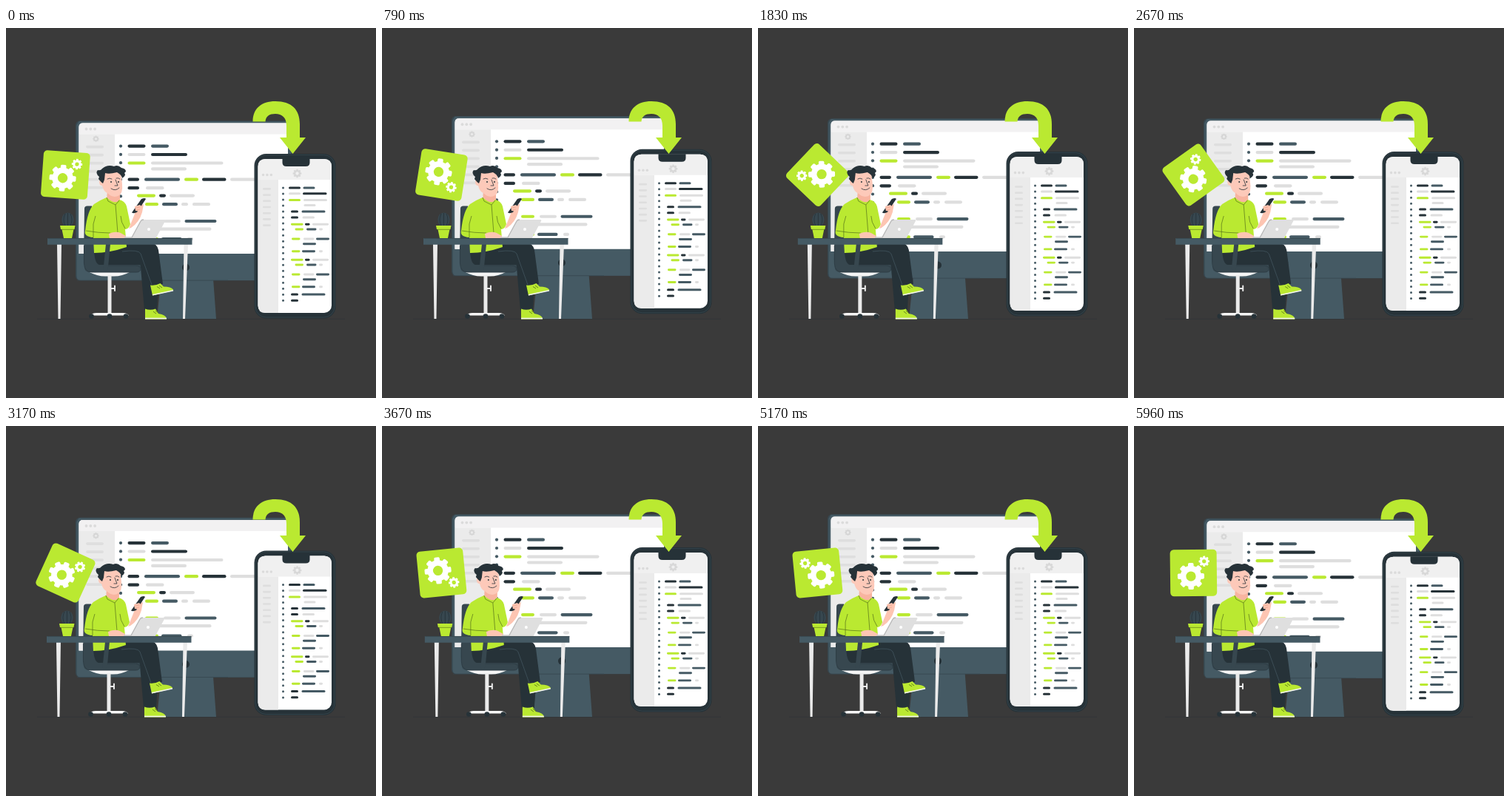
Recreate the animation shown at these times as an HTML page. Size 500 by 500 pixels, loop 6000 ms.

```html
<!DOCTYPE html>
<html lang="en">
<head>
<meta charset="utf-8">
<title>Coding at a desk</title>
<style>
  html, body { margin: 0; width: 100%; height: 100%; overflow: hidden; background: #3a3a3a; }
  svg { display: block; width: 100%; height: 100%; }
</style>
</head>
<body>
<svg viewBox="0 0 500 500">
  <path d="M42 393.3H458" stroke="#2b3236" stroke-width=".6"/>
  <path d="M211 325H279L284 393H204Z" fill="#455a64"/>

  <g class="float">
    <rect x="94" y="125.2" width="292" height="216" rx="6" fill="#37474f"/>
    <path d="M98.500 126H380Q386 126 386 132V335Q386 341 380 341H101Q95.500 341 95.500 335V131Z" fill="#455a64"/>
    <path d="M98.500 305V134Q98.500 128.500 104 128.500H381V305Z" fill="#fff"/>
    <path d="M98.500 143.500V134Q98.500 128.500 104 128.500H381V143.500Z" fill="#f2f1f2"/>
    <path d="M98.500 143.500H147V305H98.500Z" fill="#ebebeb"/>
    <path d="M96 341H300" stroke="#37474f" stroke-width=".7"/>
    <circle cx="243" cy="323.500" r="5" fill="#263238"/>
    <g id="desktop"></g>
  </g>

  <g id="badge">
    <rect x="-31.500" y="-31.500" width="63" height="63" rx="5" fill="#bae931"/>
  </g>

  <g id="worker" stroke-linejoin="round">
    <!-- chair -->
    <path d="M106 244Q106 240.500 110 240.500H116L124 322H112Q105 322 105 312Z" fill="#37474f"/>
    <path d="M112 329.500H168Q157 335.500 146 335.500H134Q123 335.500 112 329.500Z" fill="#f5f5f5"/>
    <path d="M140 334V387" stroke="#ebebeb" stroke-width="5"/>
    <path d="M141 352H147M147 348.500V355" stroke="#ebebeb" stroke-width="2" stroke-linecap="round"/>
    <path d="M114 388.500Q116 385 122 385H158Q164 385 166 388.500Z" fill="#f5f5f5"/>
    <g fill="#263238"><circle cx="115.500" cy="389.500" r="3.300"/><circle cx="140" cy="389.500" r="3.300"/><circle cx="162" cy="389.500" r="3.300"/></g>
    <path d="M106 318H182V324Q182 330 176 330H113Q106 330 106 323Z" fill="#37474f"/>

    <!-- legs -->
    <path d="M181 312L208 316L204 381H187Z" fill="#263238"/>
    <path d="M188 379.500Q195 382 202 379.500L206 386Q216 387.500 217 392.500V393.500H188Z" fill="#bae931"/>
    <path d="M188 392.500H217" stroke="#f5f5f5" stroke-width="1.600"/>
    <path d="M119 297L165 291H196Q204 291 206 300L212 346L196 349L186 320H126Q119 318 119 297Z" fill="#263238"/>
    <path d="M157 302Q179 299 182 305L197 347" fill="none" stroke="#455a64" stroke-width=".7"/>
    <path d="M195 347.500Q202 348.500 208.500 345L213 349.500Q223 349.500 226 353.500V355L198 361.500Z" fill="#bae931"/>
    <path d="M198 360.800L226 354.800" stroke="#f5f5f5" stroke-width="1.600"/>
    <path d="M204 349.500L208 352M207 348L211 351M199 383L203 386M202 382L206 385" stroke="#506b13" stroke-width=".8"/>

    <!-- head and shirt -->
    <path d="M166 271L174 251Q173 243 180 240L186 238L184 249Q180 263 169 270Z" fill="#fdc5b2"/>
    <path d="M137 218L154 220V238L145 241L136 235Z" fill="#f8b4a0"/>
    <path d="M136 229Q148 240 153 232Q161 234 163 241L168 265Q166 272 161 272L163 296Q140 304 119 304L118 283Q105 282 107 274Q110 246 119 238Q126 233 136 229Z" fill="#bae931"/>
    <path d="M136 229L138 234L148 239L153 233M148 239L151 277M118 283V265L121 254M108 274Q125 277 141 277M161 271Q155 262 155 254" fill="none" stroke="#55701a" stroke-width=".7"/>
    <path d="M129 195Q140 188 155 194L157 211Q158 223 153 226Q145 231 137 223Q132 221 130 213Q126 213 126 208Q126 204 131 205Z" fill="#fdc9b9"/>
    <path d="M131 210Q128 208 125 204L126 201Q120 196 124 192Q128 193 130 190Q137 184 146 187Q151 184 156 189Q162 190 162 194L160 196Q163 199 157 203Q156 198 150 195Q139 198 134 196L133 205Z" fill="#263238"/>
    <path d="M148 205L151 213L147 213M142 217Q148 221 153 216M137 204Q140 202 143 204M149 203Q152 202 154 204" fill="none" stroke="#263238" stroke-width=".8" stroke-linecap="round"/>
    <g fill="#263238"><circle cx="142" cy="208" r="1"/><circle cx="152" cy="208" r="1"/></g>
    <path d="M170 249.500L183 231Q188 229 189 231L177 249Q173 251 170 249.500Z" fill="#263238"/>
    <path d="M174 241L181 239L185 243L181 248L175 247Z" fill="#fdc5b2"/>
    <path d="M175 243L181 242M176 246L181 245" stroke="#eb9a84" stroke-width=".6"/>

    <!-- desk -->
    <path d="M69 292H75L73.500 393H70.500ZM240.500 292H246L242 393H239Z" fill="#ebebeb"/>
    <path d="M141 292L138 323Q137 329 133 329Q131 327 132 321L135 292Z" fill="#37474f"/>
    <path d="M105.500 294V318Q106 330 116 330H176Q182 330 182 325Q181 321 174 321H138" fill="none" stroke="#2e3d45" stroke-width="1"/>
    <path d="M56 284H251.500V292.800H56Z" fill="#455a64"/>
    <path d="M56.500 284.400H251.500" stroke="#37474f" stroke-width=".8"/>
    <path d="M139 278Q148 274 155 277L162 281V284H140Z" fill="#fdc5b2"/>
    <path d="M160 282.300H203V284H160Z" fill="#c7c7c7"/>
    <path d="M170 283L182 261Q183 259 186 259H214Q216 259 215 261L203 283.500H172Z" fill="#dfdfdf"/>
    <path d="M170 283L182 261Q183 259 186 259" fill="none" stroke="#b9b9b9" stroke-width="1.400"/>
    <circle cx="193" cy="272" r="2" fill="#fff"/>

    <!-- cactus -->
    <ellipse cx="83.500" cy="259" rx="8.200" ry="9.500" fill="#37474f"/>
    <path d="M83.500 250V268M80 251Q76 259 80 267M87 251Q91 259 87 267" fill="none" stroke="#263238" stroke-width=".8"/>
    <path d="M73 267H93.500L92.500 272H91.500L89 284H78L75.500 272H74Z" fill="#bae931"/>
    <path d="M75 272.300H92" stroke="#718f20" stroke-width=".9"/>
  </g>

  <g class="float">
    <rect x="335.500" y="170" width="110" height="222.500" rx="16" fill="#263238"/>
    <rect x="337" y="171.500" width="107" height="219.500" rx="14.500" fill="none" stroke="#37474f" stroke-width=".8"/>
    <rect x="340.500" y="177" width="99.500" height="208" rx="10" fill="#fff"/>
    <path d="M340.500 205V187Q340.500 177 350.500 177H430Q440 177 440 187V205Z" fill="#f0f0f0"/>
    <path d="M340.500 205H368V385H350.500Q340.500 385 340.500 375Z" fill="#ebebeb"/>
    <path d="M373.500 176.500H410.500V182Q410.500 187 405 187H379Q373.500 187 373.500 182Z" fill="#263238"/>
    <g id="mobile"></g>
  </g>

  <path d="M333.500 126.500C333.500 109 345 99 364 99C386 99 397 110 397 130V148H405L387.500 170L370 148H379V132C379 121 373 116 364 116C356 116 351 119 350.500 126.500Z" fill="#bae931"/>
</svg>

<script>
const $ = id => document.getElementById(id);
const colors = { k: '#263238', s: '#455a64', g: '#bae931', l: '#dedede' };

const dot = (x, y, r, fill) => `<circle cx="${x}" cy="${y}" r="${r}" fill="${fill}"/>`;

const bar = (x1, x2, y, h, color) =>
  `<path d="M${x1 + h / 2} ${y}H${x2 - h / 2}" stroke="${color}" stroke-width="${h}" stroke-linecap="round"/>`;

// Each row: "y colour+start-end ..."
const rows = (text, h, dy = 0) => text.trim().split('\n').map(row => {
  const [y, ...parts] = row.trim().split(' ');
  return parts.map(p => {
    const [a, b] = p.slice(1).split('-').map(Number);
    return bar(a, b, +y + dy, h, colors[p[0]]);
  }).join('');
}).join('');

const repeat = (n, fn) => Array.from({ length: n }, (_, i) => fn(i)).join('');

const gear = (x, y, r, fill, hole) => `<g transform="translate(${x} ${y})" fill="${fill}">` +
  dot(0, 0, r * .79, fill) +
  repeat(4, i => `<rect x="${-r * .21}" y="${-r}" width="${r * .42}" height="${2 * r}" rx="${r * .1}" transform="rotate(${i * 45})"/>`) +
  dot(0, 0, r * .37, hole) + '</g>';

$('desktop').innerHTML =
  repeat(3, i => dot(108.5 + i * 5.8, 136.5, 1.9, '#dbdbdb')) +
  gear(121.5, 149.8, 4.2, '#d6d6d6', '#ebebeb') +
  repeat(6, i => bar(108, 132, 160.6 + i * 11, 3.6, '#dedede')) +
  repeat(12, i => dot(155, 159.6 + i * 11.3, 2.1, colors.s)) +
  rows(`159.6 k164.5-188.5 s196-220
    171 l164.5-188.5 k196-245
    182.5 g164.5-188.5 l196-293.5
    190.4 l196-244
    204.7 k164.5-180 s187-235 g241-260 k265-297.5 l303-345
    216.2 k164.5-180 l189-213.5
    226.6 g177-202 k207-216 l221-255
    238.2 g188-206 s211-232 l237-246 l252-276
    261 g188-206 l213-236 s241.5-284.5
    271.7 l200-277.5
    285.2 g188-206 s210-237.5 l245-253`, 4.2);

const block = `265.2 g385-401.5 k404-410.5 l414-436
  272 g390.5-402 s406-419.5 l423-428
  285 g386-397.5 l402-416.5 s419-437
  291.7 s401-419
  301.8 g386-397.5 s400-418 l423-428`;

$('mobile').innerHTML =
  repeat(3, i => dot(347.5 + i * 5.4, 198.5, 1.8, '#dbdbdb')) +
  gear(393.5, 196.5, 5.8, '#d8d8d8', '#f0f0f0') +
  repeat(7, i => bar(347, 358, 217.4 + i * 8.2, 2.6, '#dedede')) +
  repeat(20, i => dot(374.5, 216 + i * 8.02, 1.5, colors.s)) +
  rows(`216 k382-398 s401.5-417.5
    223.8 l382-398 k401-433.5
    232.6 g382-398 l402-434
    239.4 l402.5-418.5
    248 k385-395 s399.5-431.5
    256 k385-395 l400.5-417
    360 k385-395 s399.5-431.5
    368.2 k385-395`, 3) +
  rows(block, 2.9) + rows(block, 2.9, 48);

$('badge').innerHTML += gear(-3.5, 4.5, 18, '#fff', colors.g) + gear(14.5, -15.5, 7.2, '#fff', colors.g);

const floats = document.querySelectorAll('.float');
const sway = [0, -1, 2, -4, 4, -4, 4, -4, 2, -1, 0];

function draw(now) {
  const t = now % 6000;
  const lift = 6.6 * (1 - Math.abs(t % 1500 / 750 - 1));
  floats.forEach(el => el.setAttribute('transform', `translate(0 ${-lift})`));

  $('badge').setAttribute('transform', `translate(80.4 198.5) rotate(${t * .12 + 4})`);

  const i = Math.floor(t / 600);
  const dx = .6 * (sway[i] + (sway[i + 1] - sway[i]) * (t / 600 - i));
  $('worker').setAttribute('transform', `translate(${dx} 0)`);
}

const start = performance.now();
function tick() {
  draw(performance.now() - start);
  requestAnimationFrame(tick);
}
tick();
</script>
</body>
</html>
```
